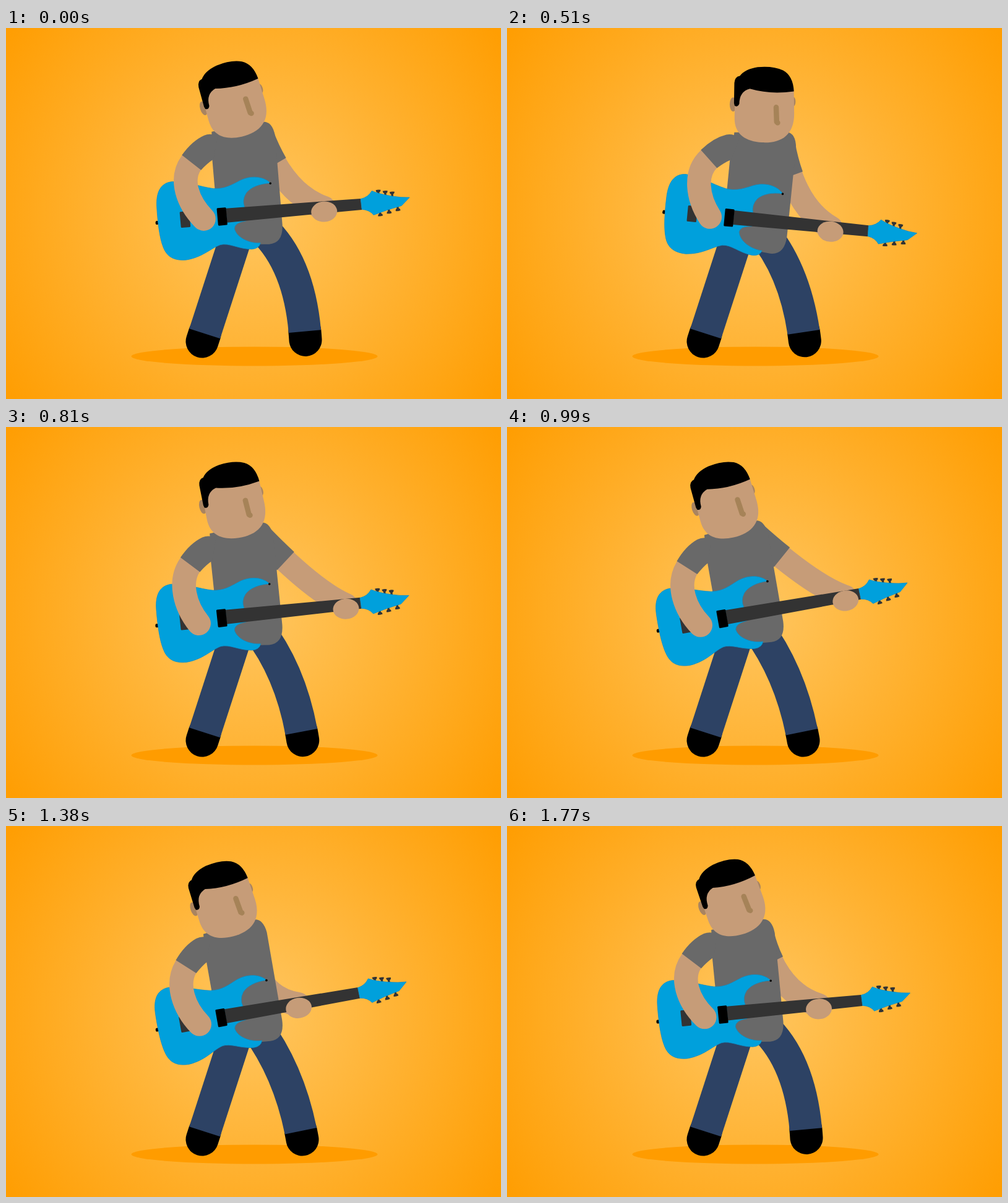
An HTML page for the animation above (1800 ms loop, 800 by 600 pixels).

```html
<!DOCTYPE html>
<html lang="en">
<head>
<meta charset="utf-8">
<title>Guitar player</title>
<style>
  html, body { margin: 0; height: 100%; overflow: hidden; }
  svg { display: block; width: 100vw; height: 100vh; }
  .line { fill: none; }
  .skin { fill: #c69c78; }
  .shirt { fill: #696969; }
  .blue { fill: #00a0dc; stroke: #0c90c8; stroke-width: .8; }
  .dark { fill: #333; }
  .shade { fill: #a98460; }
  .shoe { stroke: #000; stroke-width: 53; stroke-linecap: round; stroke-dasharray: 7 200; stroke-dashoffset: -93; }
  .jeans { stroke: #2d4264; stroke-width: 52.5; stroke-dasharray: 93 200; }
  .arm { stroke: #c69c78; stroke-width: 38.5; stroke-linecap: round; }
  .sleeve { stroke: #696969; stroke-width: 40.5; stroke-dasharray: 33 200; }
</style>
</head>
<body>
<svg viewBox="0 0 800 600">
  <defs>
    <radialGradient id="glow" gradientUnits="userSpaceOnUse" cx="400" cy="300" r="490">
      <stop offset="0" stop-color="#ffc660"/>
      <stop offset="1" stop-color="#ff9e03"/>
    </radialGradient>
    <path id="peg" d="M-4-4Q0-5 4-4Q4-1 1.700 0V4H-1.700V0Q-4-1-4-4Z"/>
  </defs>
  <rect width="800" height="600" fill="url(#glow)"/>
  <ellipse cx="401.500" cy="531" rx="199" ry="15.500" fill="#ff9c00"/>

  <path class="line shoe" pathLength="100" d="M376 325L317 507"/>
  <path class="line jeans" pathLength="100" d="M376 325L317 507"/>
  <path class="line shoe rightLeg" pathLength="100"/>
  <path class="line jeans rightLeg" pathLength="100"/>

  <g id="body">
    <path class="line arm fretArm"/>
    <path class="line sleeve fretArm" pathLength="100"/>
    <path class="shirt" d="M332 168L415 152Q430 151 434.500 174L446.500 318Q448 348 425 350H345L333 212Z"/>

    <!-- guitar -->
    <rect x="241.500" y="312.500" width="5" height="6" rx="2"/>
    <path class="blue" d="M427 251C417 241 398 238 380 246C364 254 354 261 335 260C312 257 295 249 268 249
      C250 251 242 265 243.500 290C245 315 248 340 254 355C260 371 272 377 291 375.500C318 371 330 357 346 351
      C360 347 376 358 397 358Q409 357 411 348C394 349 373 340 369 325Q369 315 388 312L385 289
      Q381 278 388 267C396 257 410 252 427 251Z"/>
    <circle cx="427" cy="251.500" r="1.800"/>
    <rect class="dark" x="281.500" y="297" width="15.500" height="26" rx="1.500" transform="rotate(-5.100 289 310)"/>
    <path class="dark" d="M355 292L573 276L575 294L357 315Z"/>
    <rect x="341.500" y="291" width="15" height="28.500" rx="1.500" transform="rotate(-5.100 349 305)"/>
    <g id="pegs" class="dark"></g>
    <path class="blue" d="M573 276.500Q585 274 591 263.500Q604 269 624 272Q638 274.500 652 274L639 287.500Q615 294 594 302.500Q587 294 575 293.500Z"/>

    <path id="strumArm" class="line arm"/>
    <path class="shirt" d="M284 206Q300 183 320 174Q330 170 342 175L335 212.500Q325 219 315 230Z"/>
    <ellipse id="hand" class="skin" rx="21" ry="16.500"/>

    <g id="head">
      <ellipse class="shade" cx="364.500" cy="123" rx="5.500" ry="11.500"/>
      <ellipse class="shade" cx="462" cy="119.500" rx="3.500" ry="7.500"/>
      <path class="skin" d="M368 95L366.500 145C366 172 385 183 410 185C440 187 462 175 463 140V98Z"/>
      <path d="M366 121L367 88Q368 78 376 77Q384 66 405 63Q430 61 446 69Q462 78 463 103
        Q425 108 392 98Q375 102 374.500 122Q372 128 367 125Z"/>
      <path class="line" d="M434 128.500L434.500 152L436 153.500" stroke="#a68358" stroke-width="8.500" stroke-linecap="round" stroke-linejoin="round"/>
    </g>
  </g>
</svg>
<script>
const LOOP = 1800, FRAME = 30, START = 1110;
const $ = q => document.querySelectorAll(q);
const set = (q, name, value) => $(q).forEach(e => e.setAttribute(name, value));
const place = (q, x, y, angle, cx, cy) => set(q, 'transform',
  `translate(${x} ${y}) rotate(${angle}) translate(${-cx} ${-cy})`);

// Progress from 0 to 1 between two times
const ramp = (t, a, b) => Math.min(1, Math.max(0, (t - a) / (b - a)));
const ease = (t, a, b) => { const u = ramp(t, a, b); return u * u * (3 - 2 * u); };

for (let i = 0; i < 3; i++) {
  $('#pegs')[0].innerHTML += `
    <use href="#peg" transform="translate(${601.5 + 11.2 * i} ${266 + 1.5 * i}) rotate(-3)"/>
    <use href="#peg" transform="translate(${604.5 + 14.2 * i} ${300 - 4.2 * i}) rotate(172)"/>`;
}

function draw(time) {
  // Unroll the loop so that every move runs forward
  const t = time < START ? time + LOOP : time;

  const swing = ease(t, 1474, 2324) - ease(t, 2330, 2750);
  const bend = ease(t, 1470, 1770) * (1 - ramp(t, 1800, 2750));
  const nod = -12 - 9.5 * ease(t, 1260, 1720) + 21.5 * ease(t, 1720, 2000) - 12 * ease(t, 2000, 2360);
  const slide = 75 - 75 * ramp(t, 1110, 1230) + 39 * ramp(t, 1680, 1800) + 36 * ramp(t, 2310, 2430);
  const strum = .5 + .5 * Math.cos((t - 285) / 600 * 2 * Math.PI);

  place('#body', 348 + 11 * swing ** 2, 309.8 - 4.8 * bend - swing, 15.7 * swing - 5.1, 349, 305);
  place('#head', 381, 155, nod, 416.5, 165);
  set('.rightLeg', 'd', `M${404 + 11 * bend} 325Q${460 + 16.5 * bend} ${400 - 17 * bend} ${479 + 5 * bend} ${507 - 2.5 * bend}`);

  const x = 475 + slide, y = 300.7 - .09 * slide;
  set('.fretArm', 'd', `M412 172Q${396 + 1.35 * slide} ${274 - .14 * slide} ${x} ${y - 6}`);
  place('#hand', x, y, -4, 0, 0);
  set('#strumArm', 'd', `M299.5 218C280 245 ${293 - 4 * strum} ${282 + 3 * strum} ${319.5 - 9 * strum} ${309 + 5 * strum}`);
}

function tick(now) {
  draw(Math.floor(now / FRAME) * FRAME % LOOP);
  requestAnimationFrame(tick);
}
draw(0);
requestAnimationFrame(tick);
</script>
</body>
</html>
```
